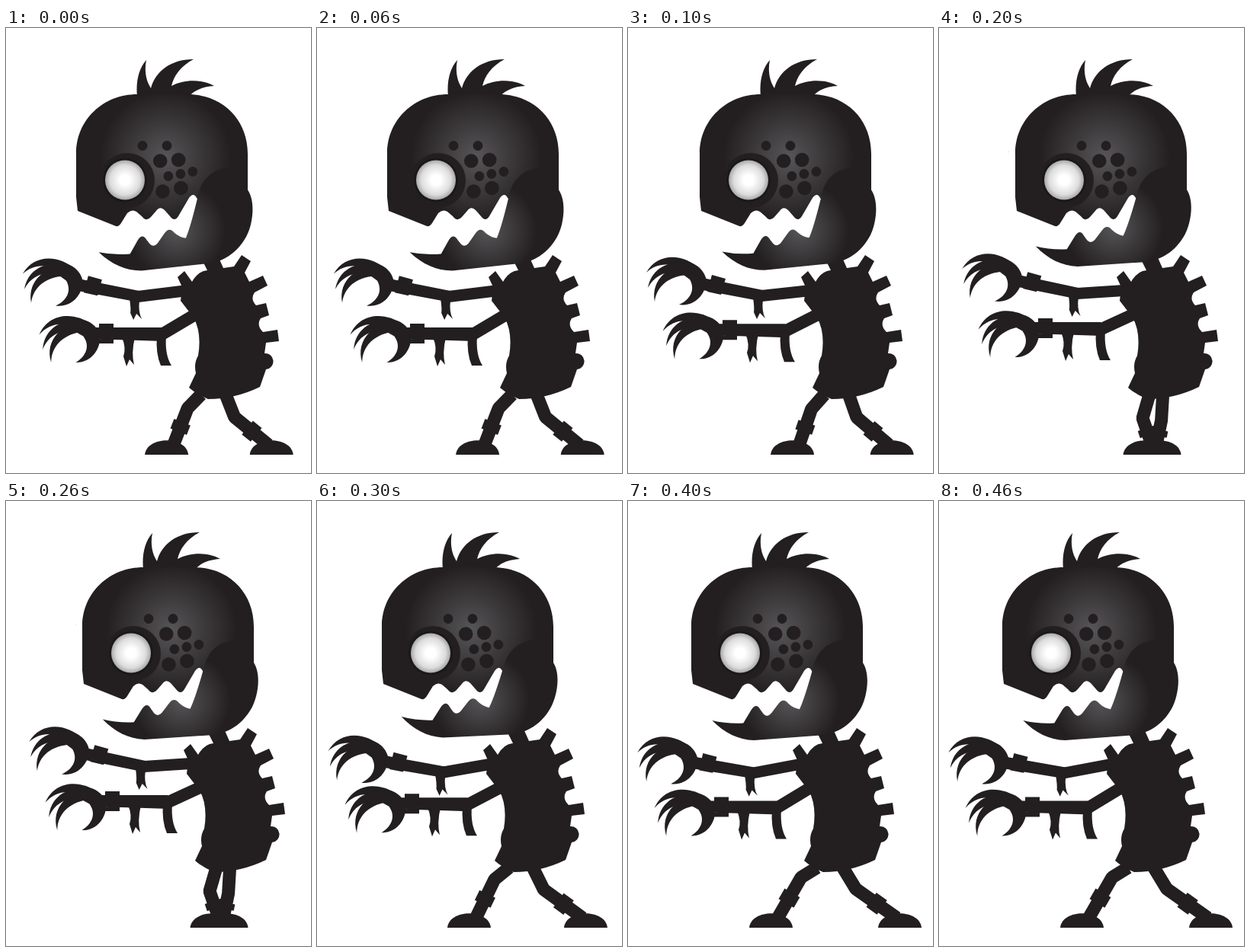
These frames come from a looping animation (400x584 px, 500 ms). An HTML page:

```html
<!DOCTYPE html>
<html lang="en">
<head>
<meta charset="utf-8">
<title>Walking zombie</title>
<style>
  html, body { margin: 0; width: 100%; height: 100%; overflow: hidden; background: #fff; }
  svg { display: block; width: 400px; height: 584px; }
</style>
</head>
<body>
<svg viewBox="0 0 400 584" fill="#231f20">
  <defs>
    <radialGradient id="skin" gradientUnits="userSpaceOnUse" cx="209" cy="169" r="86">
      <stop offset="0" stop-color="#565557"/>
      <stop offset="1" stop-color="#231f20"/>
    </radialGradient>
    <radialGradient id="cheek" gradientUnits="userSpaceOnUse" cx="224" cy="266" r="64">
      <stop offset="0" stop-color="#565557"/>
      <stop offset="1" stop-color="#231f20"/>
    </radialGradient>
    <radialGradient id="glow">
      <stop offset=".25" stop-color="#fff"/>
      <stop offset=".75" stop-color="#dcdcdc"/>
      <stop offset="1" stop-color="#a8a8a8"/>
    </radialGradient>
    <g id="hand">
      <path d="M70 308C86 306 98 317 101 331C100 351 84 366 65 363C79 357 87 344 79 330L68 322Z"/>
    </g>
  </defs>

  <g id="legs" fill="none" stroke="#231f20"></g>

  <g id="body">
    <path d="M256 302L277 297L285 315L299 313L309 298L321 306L313 321L319 333L337 325L343 338L326 347
      Q320 356 328 364L341 361L345 377L334 381Q328 390 337 399L356 396L358 411L341 413L339 427
      A10 10 0 0 1 341 448L333 471Q300 487 265 487Q250 481 240 472L249 453
      Q246 440 252 430Q257 400 246 380L229 358L231 340L225 327L234 319L244 333Q252 319 264 318Z"/>
    <path id="upper1" fill="none" stroke="#231f20" stroke-width="15"/>
    <path id="upper2" fill="none" stroke="#231f20" stroke-width="16"/>
    <g id="arm1">
      <use href="#hand"/>
      <path d="M96 328L175 344V359L96 344ZM108 324L126 329L120 350L102 346Z"/>
      <path d="M162 354Q164 368 163 373L167 382L171 374L178 381Q173 372 175 356Z"/>
    </g>
    <g id="arm2">
      <use href="#hand" transform="translate(23 73) rotate(-7 75 335)"/>
      <path d="M112 391H204L212 400L206 409L112 406ZM122 386H141V412H122Z"/>
      <path d="M152 404Q158 418 154 429L158 442L162 433L168 440Q164 425 169 404Z"/>
      <path d="M198 402Q196 425 203 441H217Q208 427 210 402Z"/>
    </g>
  </g>

  <g id="head">
    <path d="M172 90C170 71 174 53 184 42C181 57 184 70 190 79C196 57 216 41 246 41
      C229 50 220 63 217 76C234 67 257 67 273 76C257 77 246 82 239 91Z"/>
    <path fill="url(#skin)" d="M94 240L92 222V165C92 120 128 87 172 87H238C284 87 317 120 317 165V225L262 240
      L250 223Q246 215 240 223L226 247Q221 255 215 247L208 239Q202 233 197 240L190 248
      Q184 255 178 247L171 241Q165 237 159 243L151 256Q148 261 144 260Z"/>
    <circle cx="159" cy="200" r="36"/>
    <circle cx="156" cy="199.500" r="29" fill="#1b1819"/>
    <circle cx="156" cy="199.500" r="26" fill="url(#glow)"/>
    <g id="spots"></g>
    <path id="jaw" fill="url(#cheek)" d="M251 224C255 200 268 186 292 183L316 211C329 228 323 262 314 276
      C302 297 284 306 268 309L178 319C157 319 139 311 122 295Q142 299 163 297L173 279
      Q179 269 185 279L189 284Q194 289 199 283L208 270Q214 261 221 269Q228 275 236 276Q242 262 251 224Z"/>
  </g>
</svg>
<script>
const $ = id => document.getElementById(id);
const set = (id, value, name = 'transform') => $(id).setAttribute(name, value);

// The walk has five held poses; sway is the lean in pixels, stride runs from 0 (feet together) to 1.
const sway = [0, 2, 8, -7, -9];
const stride = [.72, .66, 0, .855, 1];
const wave = (step, peak) => Math.cos((step - peak) / sway.length * 2 * Math.PI);

// Three equal claws fan out from the palm.
for (let i = 0; i < 3; i++) {
  $('hand').innerHTML += `<path transform="rotate(${-20 * i} 80 325)"
    d="M92 316C72 297 38 293 22 321C37 307 58 307 78 322Z"/>`;
}

// Staggered rows of spots, alternately small and large.
for (let row = 0; row < 4; row++) {
  for (let col = 0; col < (row === 2 ? 3 : 2); col++) {
    const x = 179 + 34 * Math.sin(row * .75) + col * (24 + 8 * Math.cos(row * Math.PI / 2));
    const y = 154.5 + 20 * row - 1.5 * col * row;
    $('spots').innerHTML += `<circle cx="${x}" cy="${y}" r="${row % 2 ? 9.3 : 6.4}"/>`;
  }
}

function leg(hip, kneeX, kneeY, foot, ankle) {
  const at = k => `${kneeX + (ankle - kneeX) * k} ${kneeY + (547 - kneeY) * k}`;
  return `<path stroke-width="17" stroke-linejoin="bevel" d="M${hip} 481L${at(0)}L${at(1)}"/>
    <path stroke-width="23" d="M${at(.38)}L${at(.64)}"/>
    <path stroke="none" fill="#231f20" d="M${foot - 28.5} 560c2.500 -25 54.500 -25 57 0Z"/>`;
}

function draw(step) {
  const x = sway[step], s = stride[step];
  const lift1 = 1 - x / 2;
  const lift2 = 4 * wave(step, 4.4) - 1;
  set('body', `translate(${x})`);
  set('head', `translate(${x})`);
  set('jaw', `rotate(${1.8 + 1.8 * wave(step, 2.9)} 310 220)`);
  set('arm1', `translate(0 ${lift1}) rotate(${-lift1 / 4} 175 351)`);
  set('arm2', `translate(0 ${lift2})`);
  set('upper1', `M173 ${351.5 + lift1}L242 344`, 'd');
  set('upper2', `M203 ${401 + lift2}L255 372`, 'd');

  const left = 270 - 82.5 * s;
  const right = 289 + 67.5 * s ** .4;
  const hip = 288 + .7 * x;
  $('legs').innerHTML =
    leg(276 - 28 * s, 267 - 40 * s, 512 - 18 * s, left, left + 9) +
    leg(hip, hip - 2 + 19 * s, 515 - 6 * s, right, right - 4);
}

let shown = -1;
function tick(now) {
  const step = Math.floor(now / 100) % sway.length;
  if (step !== shown) draw(shown = step);
  requestAnimationFrame(tick);
}
tick(0);
</script>
</body>
</html>
```
